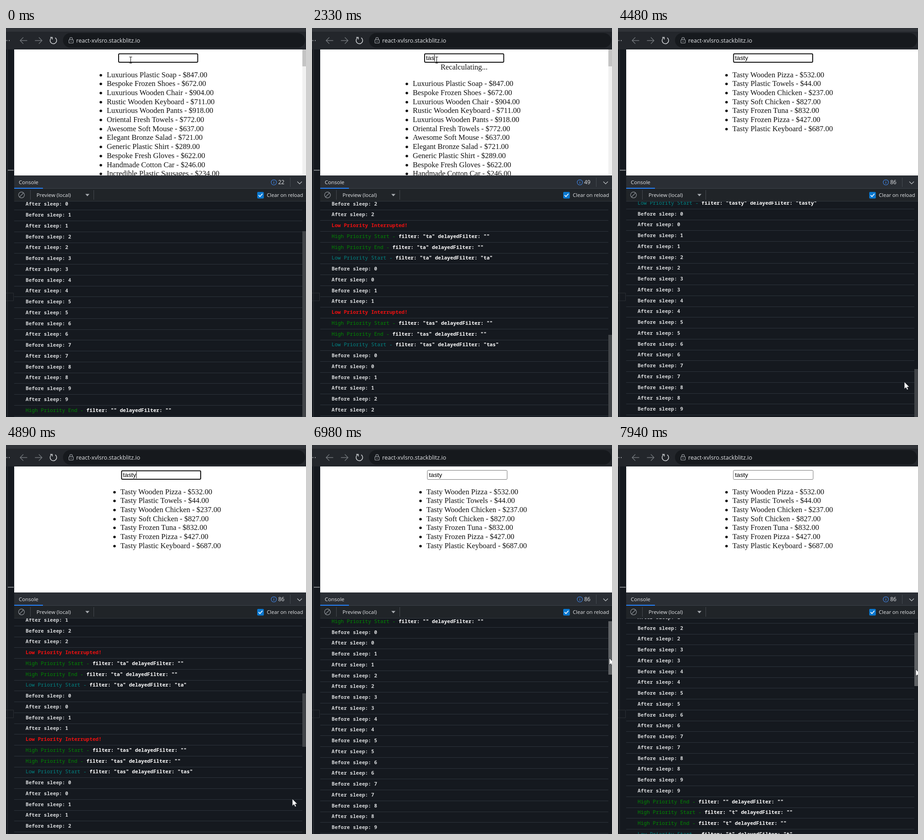
Write an HTML page that moves like this. It is 658 px wide and 852 px high and loops after 8000 ms.

```html
<!DOCTYPE html>
<html lang="en">
<head>
<meta charset="utf-8">
<style>
html, body { margin: 0; width: 658px; height: 852px; overflow: hidden; background: #15191f; }
svg { display: block; }
text { white-space: pre; }
.ui { font-family: "Open Sans", sans-serif; font-size: 11.4px; fill: #e4e6e9; }
.page { font-family: "Liberation Serif", serif; font-size: 16.5px; fill: #111; }
.field { font-family: "Liberation Sans", sans-serif; font-size: 13.7px; fill: #000; }
.log { font-family: "Noto Sans Mono", monospace; font-size: 11.12px; font-weight: 600; fill: #d6d8da; }
.log .plain { font-weight: 400; }
.log .args { font-weight: 700; fill: #fff; }
</style>
</head>
<body>
<svg id="stage" width="658" height="852" viewBox="0 0 658 852">
  <defs>
    <clipPath id="pageClip"><rect x="18" y="47" width="640" height="276"/></clipPath>
    <clipPath id="logClip"><rect x="18" y="380" width="640" height="472"/></clipPath>
  </defs>

  <!-- browser bar -->
  <rect width="658" height="852" fill="#15191f"/>
  <rect width="658" height="47" fill="#23262b"/>
  <rect width="658" height="8" fill="#303338"/>
  <rect x="125" y="11" width="531" height="32" rx="16" fill="#16191d"/>
  <g fill="#c9ccd0"><circle cx="2" cy="27.5" r="1"/><circle cx="7" cy="27.5" r="1"/></g>
  <g fill="none" stroke="#73777c" stroke-width="1.3">
    <path d="M46.5 27.5H31M38 20.5l-7 7 7 7"/>
    <path d="M63.5 27.5H79M72 20.5l7 7-7 7"/>
  </g>
  <path d="M99.5 21.5A7.2 7.2 0 1 0 108 21.3M97 20.5h4.5v4.5" fill="none" stroke="#d6d9dc" stroke-width="1.5"/>
  <g fill="none" stroke="#a9adb2" stroke-width="1.1">
    <rect x="138" y="25.5" width="9.5" height="7.5" rx="1"/>
    <path d="M140 25.5v-2a2.75 2.75 0 0 1 5.5 0v2"/>
  </g>
  <circle cx="142.7" cy="29.2" r=".9" fill="#a9adb2"/>
  <text class="ui" x="154" y="32" style="font-size:12.64px">react-xvlsro.stackblitz.io</text>

  <!-- left edge -->
  <path d="M3.5 47V852" stroke="#30353b"/>
  <path d="M4 311.5H17" stroke="#a0a4a8" stroke-width="1.5"/>
  <path d="M0 580.5H16.5V597.5H0" fill="none" stroke="#2b2f34"/>

  <!-- page -->
  <rect x="18" y="47" width="640" height="276" fill="#fff"/>
  <g clip-path="url(#pageClip)">
    <g id="pageBar">
      <rect x="650" y="47" width="8" height="276" fill="#f1f1f1"/>
      <rect x="650" y="47" width="8" height="37" fill="#c4c4c4"/>
    </g>
    <g id="input">
      <rect id="focus" x="247" y="56.5" width="173.5" height="18.5" rx="2" fill="#fff" stroke="#101010" stroke-width="2"/>
      <rect id="blur" x="246.5" y="55.5" width="175" height="20" rx="2" fill="#fff" stroke="#767676"/>
      <text id="typed" class="field" x="250" y="70"></text>
      <rect id="caret" y="58" width="1" height="15" fill="#000"/>
    </g>
    <text id="busy" class="page" x="282" y="91">Recalculating...</text>
    <g id="full" class="page"></g>
    <g id="pushed" class="page"></g>
    <g id="hits" class="page"></g>
  </g>

  <!-- console -->
  <rect x="18" y="323" width="640" height="28" fill="#2a2e34"/>
  <rect x="18" y="351" width="640" height="1" fill="#3c4148"/>
  <rect x="18" y="350" width="63" height="2" fill="#2684ff"/>
  <text class="ui" x="28" y="342" style="font-size:11.5px">Console</text>
  <circle cx="587.5" cy="338" r="5.8" fill="none" stroke="#3f86e8" stroke-width="1.1"/>
  <path d="M587.5 337v4M587.5 334.5v1.3" stroke="#3f86e8" stroke-width="1.2"/>
  <text id="badge" class="ui" x="597" y="342" style="font-size:12px"></text>
  <path d="M623.5 328V348" stroke="#454a51"/>
  <path d="M639 336.5l5 5 5-5" fill="none" stroke="#c3c6ca" stroke-width="1.2"/>
  <rect x="18" y="352" width="640" height="27" fill="#202428"/>
  <rect x="18" y="379" width="640" height="1" fill="#30363d"/>
  <g fill="none" stroke="#90959b" stroke-width="1.2"><circle cx="34" cy="365.7" r="6.5"/><path d="M38.5 361L29.5 370.4"/></g>
  <path d="M53.5 355V376M192.5 355V376" stroke="#454a51"/>
  <text class="ui" x="67" y="370">Preview (local)</text>
  <path d="M174 363.5h9l-4.5 5z" fill="#a9adb2"/>
  <rect x="551" y="359" width="14.5" height="14.5" rx="2" fill="#0a78d0"/>
  <path d="M554 366l3 3.2 5.5-6.2" fill="none" stroke="#fff" stroke-width="1.7"/>
  <text class="ui" x="572" y="370" style="font-size:11.2px">Clear on reload</text>
  <g clip-path="url(#logClip)">
    <g id="log" class="log"></g>
    <rect id="thumb" x="650" width="8"/>
  </g>

  <path id="beam" d="M-3 -6.5h2.5l.5 .5 .5-.5h2.5M0 -6V6.5M-3 7h2.5l.5-.5 .5 .5h2.5" fill="none" stroke="#111" stroke-width="1.1"/>
  <path id="arrow" d="M0 0V15.5L3.6 12.2 6 17.5 8.6 16.3 6.2 11.3H11Z" fill="#fff" stroke="#15191f" stroke-width=".8"/>
</svg>
<script>
const LOOP = 8000, ROW = 23.75, VIEW = 494, PROMPT = 23, DONE = 3100, CLICK = 6440;
const $ = id => document.getElementById(id);
const show = (id, on) => $(id).setAttribute("display", on ? "inline" : "none");
const move = (id, x, y) => $(id).setAttribute("transform", `translate(${x} ${y})`);

const products = `Luxurious Plastic Soap - $847.00
Bespoke Frozen Shoes - $672.00
Luxurious Wooden Chair - $904.00
Rustic Wooden Keyboard - $711.00
Luxurious Wooden Pants - $918.00
Oriental Fresh Towels - $772.00
Awesome Soft Mouse - $637.00
Elegant Bronze Salad - $721.00
Generic Plastic Shirt - $289.00
Bespoke Fresh Gloves - $622.00
Handmade Cotton Car - $246.00
Incredible Plastic Sausages - $234.00`.split("\n");
const matches = `Tasty Wooden Pizza - $532.00
Tasty Plastic Towels - $44.00
Tasty Wooden Chicken - $237.00
Tasty Soft Chicken - $827.00
Tasty Frozen Tuna - $832.00
Tasty Frozen Pizza - $427.00
Tasty Plastic Keyboard - $687.00`.split("\n");

const list = (id, items, x, firstLine) => {
  $(id).innerHTML = items.map((s, i) => {
    const y = Math.floor(108 + (i + firstLine) * 19.7);
    return `<circle cx="${x - 13}" cy="${y - 4.5}" r="2.8"/><text x="${x}" y="${y}">${s}</text>`;
  }).join("");
};
list("full", products, 221, 0);
list("pushed", products, 221, 1);
list("hits", matches, 251, 0);

// Console messages, each with the time it appears
const logs = [];
const add = (time, body) => logs.push({ time, body });
const span = (cls, fill, s) => `<tspan class="${cls}" style="fill:${fill}">${s}</tspan>`;
const state = (time, color, label, filter, delayed) =>
  add(time, span("plain", color, label + " - ") +
    span("args", "#fff", `filter: "${filter}" delayedFilter: "${delayed}"`));
const high = (time, edge, filter) => state(time, "#008a00", "High Priority " + edge, filter, "");
const low = (time, edge, filter) => state(time, "#008585", "Low Priority " + edge, filter, filter);
const sleeps = (time, n, gap) => {
  for (let i = 0; i < n; i++)
    for (const word of ["Before", "After"]) add(time + (i + 1) * gap, `${word} sleep: ${i}`);
};

add(0, `<tspan font-weight="400" font-style="italic" fill="#8f9398">Console was cleared</tspan>`);
high(0, "Start", "");
sleeps(0, 10, 0);
high(0, "End", "");

const keys = [[1980, 3], [2120, 2], [2215, 3], [2345, 4], [2500, 10]];
keys.forEach(([time, pairs], i) => {
  const word = "tasty".slice(0, i + 1);
  if (i) add(time, span("args", "#f01010", "Low Priority Interrupted!"));
  high(time, "Start", word);
  high(time, "End", word);
  low(time, "Start", word);
  sleeps(time, pairs, i < 4 ? 36 : 60);
});
low(DONE, "End", "tasty");

$("log").innerHTML = logs.map((m, i) => {
  const y = 380 + i * ROW;
  return `<g><text x="43" y="${Math.round(y + 13)}">${m.body}</text>` +
    `<rect x="18" y="${Math.round(y + 22)}" width="632" height="1" fill="#2d343c"/></g>`;
}).join("");
const rows = [...$("log").children];

// Linear track through [time, ...values] points
const track = (points, t) => {
  const n = points.findIndex(p => p[0] > t);
  if (n === 0) return points[0].slice(1);
  if (n < 0) return points[points.length - 1].slice(1);
  const a = points[n - 1], b = points[n], k = (t - a[0]) / (b[0] - a[0]);
  return a.slice(1).map((v, i) => v + (b[i + 1] - v) * k);
};
const wheel = [[4420, 1596], [4480, 1552], [4700, 1130], [4950, 560], [5040, 560], [5370, 0],
  [6560, 0], [6980, 27], [7280, 60], [7420, 60], [7940, 131]];
const mouse = [[3300, 273, 70], [3400, 262, 88], [3600, 320, 210], [3900, 520, 560], [4120, 600, 701],
  [4360, 628, 775], [4950, 628, 775], [5370, 632, 763], [5640, 632, 763], [5800, 634, 776],
  [6100, 645, 600], [6380, 652, 460], [6980, 652, 460], [7940, 653, 460]];
const blinks = [[310, 810], [1360, 1920], [1980, 2980], [3480, 4010], [4540, 5070], [5620, 6150]];

function draw(t) {
  const done = t >= DONE, focused = t < CLICK;
  const typed = "tasty".slice(0, keys.filter(k => k[0] <= t).length);
  const busy = typed !== "" && !done;

  // page
  $("typed").textContent = typed;
  $("caret").setAttribute("x", 250 + Math.round($("typed").getComputedTextLength()));
  show("caret", blinks.some(([a, b]) => t >= a && t < b));
  show("focus", focused);
  show("blur", !focused);
  move("input", done ? 6.5 : 0, 0);
  show("pageBar", !done);
  show("busy", busy);
  show("full", !done && !busy);
  show("pushed", busy);
  show("hits", done);

  // console
  const count = logs.filter(m => m.time <= t).length;
  const height = count * ROW + PROMPT, ratio = VIEW / height;
  const scroll = t < 4420 ? height - VIEW : track(wheel, t)[0];
  rows.forEach((r, i) => r.setAttribute("display", i < count ? "inline" : "none"));
  move("log", 0, -Math.round(scroll));
  $("badge").textContent = count - 1;
  $("thumb").setAttribute("y", Math.round(380 + scroll * ratio));
  $("thumb").setAttribute("height", Math.round(VIEW * ratio));
  $("thumb").setAttribute("fill", focused ? "#424549" : "#5f6265");

  // pointer
  let [x, y] = track(mouse, t);
  if (!focused) y += scroll * ratio;
  const overText = y < 76 || (y > 95 && y < 229);
  show("beam", overText);
  show("arrow", !overText);
  move("beam", x + .5, y);
  move("arrow", x, y);
}

function tick() {
  draw(performance.now() % LOOP);
  requestAnimationFrame(tick);
}
tick();
</script>
</body>
</html>
```
